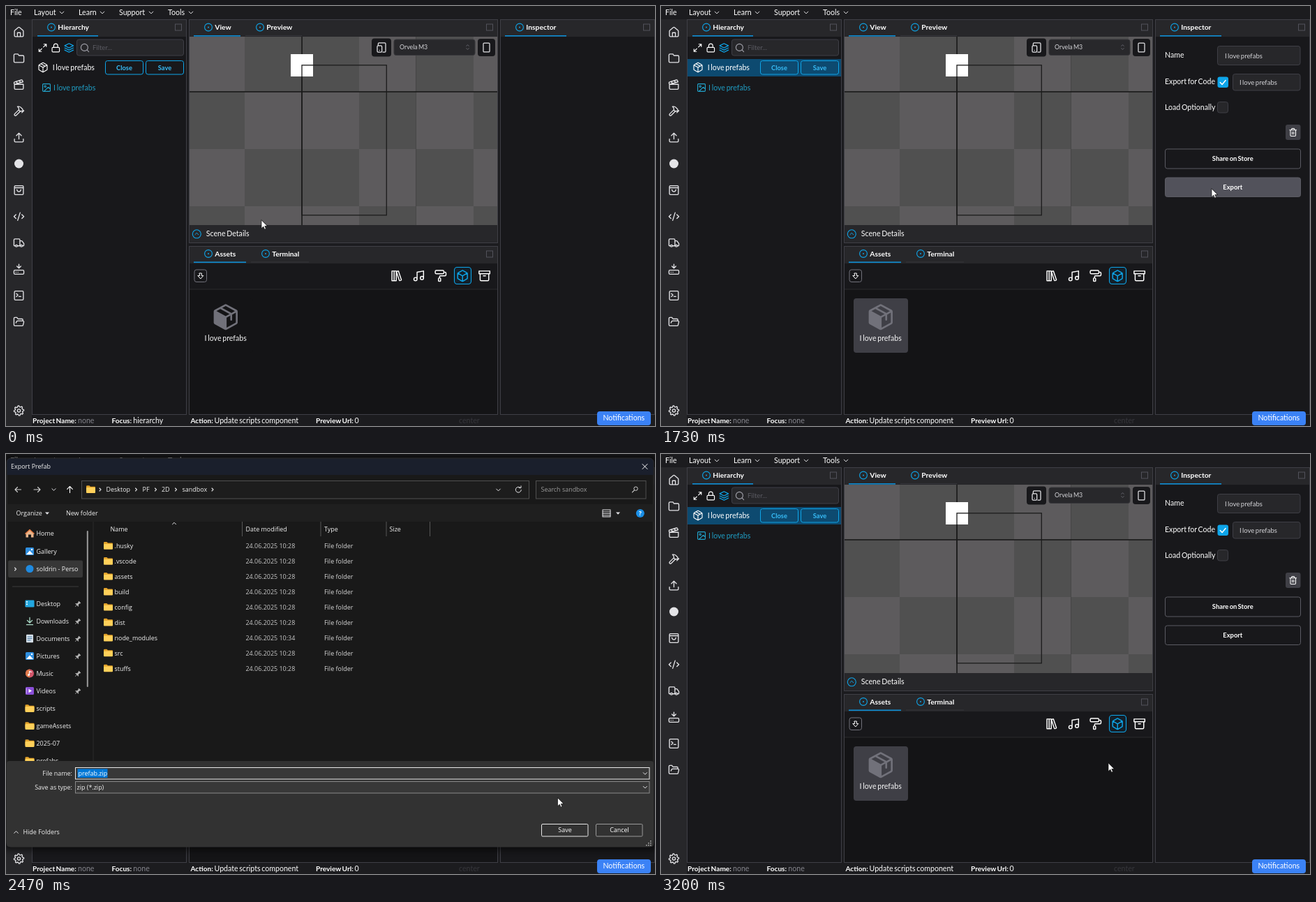
These frames come from a looping animation (930 by 602 pixels, 4200 ms). An HTML page:

```html
<!DOCTYPE html>
<html lang="en">
<head>
<meta charset="utf-8">
<title>Prefab export</title>
<style>
html, body { margin: 0; width: 100%; height: 100%; overflow: hidden; background: #1c1c1f; }
svg { display: block; width: 930px; height: 602px; }
text { white-space: pre; }
.app { font-family: Lato, "Open Sans", sans-serif; word-spacing: -1px; }
.win { font-family: "Open Sans", "Noto Sans", sans-serif; }
</style>
</head>
<body>
<svg id="stage" viewBox="0 0 930 602" xmlns="http://www.w3.org/2000/svg"></svg>
<script>
const BLUE = '#0ea5e9', LINE = '#3f3f46', BAR = '#27272a', BODY = '#18181b', PALE = '#e4e4e7';

// Drawing helpers: each returns markup
const rect = (x, y, w, h, fill, rx = 0, stroke = 'none', sw = 1) =>
  `<rect x="${x}" y="${y}" width="${w}" height="${h}" rx="${rx}" fill="${fill}" stroke="${stroke}" stroke-width="${sw}"/>`;
const circle = (x, y, r, fill, stroke = 'none', sw = 1.2) =>
  `<circle cx="${x}" cy="${y}" r="${r}" fill="${fill}" stroke="${stroke}" stroke-width="${sw}"/>`;
const text = (x, y, str, size = 10.6, fill = '#fff', weight = 400, anchor = 'start') =>
  `<text x="${x}" y="${y}" font-size="${size}" fill="${fill}" font-weight="${weight}" text-anchor="${anchor}">${str}</text>`;
const bold = (x, y, str, fill = '#fff', size = 10.3, anchor = 'start') => text(x, y, str, size, fill, 700, anchor);
const line = (d, stroke = PALE, sw = 1, fill = 'none') =>
  `<path d="${d}" fill="${fill}" stroke="${stroke}" stroke-width="${sw}" stroke-linecap="round" stroke-linejoin="round"/>`;
const shape = (d, fill) => `<path d="${d}" fill="${fill}" fill-rule="evenodd"/>`;
const at = (x, y, s, body) => `<g transform="translate(${x} ${y}) scale(${s})">${body}</g>`;
const chevron = (x, y, r, dir = 1, color = PALE, sw = 1) =>
  line(`M${x - r} ${y - dir * r / 2}l${r} ${dir * r}l${r} ${-dir * r}`, color, sw);
const next = (x, y) => line(`M${x - 1} ${y - 2}l2 2l-2 2`, PALE, 1.1);

// Icons on a 24 unit grid
const gear = Array.from({ length: 32 }, (_, i) => {
  const r = i % 4 < 2 ? 10 : 7.6, a = (i + 0.5) * Math.PI / 16 - 0.3;
  return (i ? 'L' : 'M') + (12 + r * Math.cos(a)).toFixed(2) + ' ' + (12 + r * Math.sin(a)).toFixed(2);
}).join('') + 'Z';
const ring = (x, y, r) => `M${x - r} ${y}a${r} ${r} 0 1 0 ${2 * r} 0a${r} ${r} 0 1 0 ${-2 * r} 0`;
const cube = 'M21 8a2 2 0 0 0-1-1.7l-7-4a2 2 0 0 0-2 0l-7 4A2 2 0 0 0 3 8v8a2 2 0 0 0 1 1.7l7 4a2 2 0 0 0 2 0l7-4A2 2 0 0 0 21 16zM3.3 7 12 12l8.7-5M12 22V12';
const ICONS = {
  home: 'M3 10a2 2 0 0 1 .7-1.5l7-6a2 2 0 0 1 2.6 0l7 6a2 2 0 0 1 .7 1.5v9a2 2 0 0 1-2 2H5a2 2 0 0 1-2-2zM9 21v-8h6v8',
  folder: 'M20 20a2 2 0 0 0 2-2V8a2 2 0 0 0-2-2h-8l-2-3H4a2 2 0 0 0-2 2v13a2 2 0 0 0 2 2z',
  clapper: 'M20.2 6 3 11l-.9-2.4a2 2 0 0 1 1.4-2.5l13.5-4a2 2 0 0 1 2.4 1.4zM6.2 5.3l3.1 3.9M12.4 3.4l3.1 4M3 11h18v8a2 2 0 0 1-2 2H5a2 2 0 0 1-2-2z',
  hammer: 'm15 12-8.5 8.5a2 2 0 0 1-3-3L12 9M18 15l4-4M21.5 11.5l-2-2V8L16 4.4a6 6 0 0 0-4.2-1.8H9l1 1A6 6 0 0 1 12 8v2l2 2h2z',
  upload: 'M21 15v4a2 2 0 0 1-2 2H5a2 2 0 0 1-2-2v-4M17 8l-5-5-5 5M12 3v12',
  bag: 'M5 3h14a2 2 0 0 1 2 2v14a2 2 0 0 1-2 2H5a2 2 0 0 1-2-2V5a2 2 0 0 1 2-2zM3 7h18M16 11a4 4 0 0 1-8 0',
  code: 'm18 16 4-4-4-4M6 8l-4 4 4 4M14.5 4l-5 16',
  truck: 'M14 18V6a2 2 0 0 0-2-2H4a2 2 0 0 0-2 2v11a1 1 0 0 0 1 1h2M15 18H9M19 18h2a1 1 0 0 0 1-1v-3.7l-3.7-4.9a1 1 0 0 0-.8-.4H14' + ring(7, 18, 2) + ring(17, 18, 2),
  drive: 'M12 2v8M16 6l-4 4-4-4M4 14h16a2 2 0 0 1 2 2v4a2 2 0 0 1-2 2H4a2 2 0 0 1-2-2v-4a2 2 0 0 1 2-2zM6 18h.01M10 18h.01',
  terminal: 'M5 3h14a2 2 0 0 1 2 2v14a2 2 0 0 1-2 2H5a2 2 0 0 1-2-2V5a2 2 0 0 1 2-2zM7 8l3 3-3 3M12 14h4',
  open: 'm6 14 1.5-2.9A2 2 0 0 1 9.2 10H20a2 2 0 0 1 1.9 2.5l-1.5 6a2 2 0 0 1-2 1.5H4a2 2 0 0 1-2-2V5a2 2 0 0 1 2-2h4l2 3h8a2 2 0 0 1 2 2v2',
  gear: gear + ring(12, 12, 3),
  books: 'M3 3h8v18H3zM7 3v18M20.4 18.9a1 1 0 0 1-.6 1.3l-1.9.6a1 1 0 0 1-1.3-.6L11.5 5.1a1 1 0 0 1 .6-1.3l1.9-.6a1 1 0 0 1 1.3.6z',
  music: 'M9 18V5l12-2v13' + ring(6, 18, 3) + ring(18, 16, 3),
  roller: 'M4 2h12a2 2 0 0 1 2 2v2a2 2 0 0 1-2 2H4a2 2 0 0 1-2-2V4a2 2 0 0 1 2-2zM10 16v-2a2 2 0 0 1 2-2h8a2 2 0 0 0 2-2V7a2 2 0 0 0-2-2h-2M9 16h2a1 1 0 0 1 1 1v4a1 1 0 0 1-1 1H9a1 1 0 0 1-1-1v-4a1 1 0 0 1 1-1z',
  cube,
  parcel: cube + 'M7.5 4.3l9 5.1',
  archive: 'M2 3h20v5H2zM4 8v11a2 2 0 0 0 2 2h12a2 2 0 0 0 2-2V8M10 12h4',
  expand: 'M15 3h6v6M9 21H3v-6M21 3l-7 7M3 21l7-7',
  lock: 'M5 11h14a2 2 0 0 1 2 2v7a2 2 0 0 1-2 2H5a2 2 0 0 1-2-2v-7a2 2 0 0 1 2-2zM7 11V7a5 5 0 0 1 10 0v4',
  layers: 'M12 2 22 7 12 12 2 7zM2 12l10 5 10-5M2 17l10 5 10-5',
  search: ring(11, 11, 8) + 'M21 21l-4.3-4.3',
  image: 'M5 3h14a2 2 0 0 1 2 2v14a2 2 0 0 1-2 2H5a2 2 0 0 1-2-2V5a2 2 0 0 1 2-2zM21 15l-5-4L6 21' + ring(9, 9, 2),
  trash: 'M3 6h18M19 6v14a2 2 0 0 1-2 2H7a2 2 0 0 1-2-2V6M8 6V4a2 2 0 0 1 2-2h4a2 2 0 0 1 2 2v2M10 11v6M14 11v6',
  down: 'M9 4h6v7h5l-8 9-8-9h5z',
  phone: 'M7 2h10a2 2 0 0 1 2 2v16a2 2 0 0 1-2 2H7a2 2 0 0 1-2-2V4a2 2 0 0 1 2-2z',
  devices: 'M5 8V4a2 2 0 0 1 2-2h12a2 2 0 0 1 2 2v16a2 2 0 0 1-2 2h-4M5 8h6a2 2 0 0 1 2 2v10a2 2 0 0 1-2 2H5a2 2 0 0 1-2-2V10a2 2 0 0 1 2-2zM8 18h.01'
};
const icon = (name, x, y, size = 17, color = PALE, sw = 1.9) =>
  at(x - size / 2, y - size / 2, size / 24, line(ICONS[name], color, sw));

const tab = (x, y, label, from, to, active = true) =>
  circle(x, y, 5.4, 'none', BLUE, 1.1) + circle(x, y, 1, BLUE) + bold(x + 9.3, y + 3.8, label) +
  rect(from, y + 11.5, to - from, active ? 1.6 : 1, active ? '#0e8fd6' : '#36363b');
const panel = (x, y, w, h) =>
  rect(x + .5, y + .5, w - 1, h - 1, BODY, 0, LINE) + rect(x + 1, y + 1, w - 2, 24, BAR) +
  rect(x + w - 16.5, y + 7, 9, 9, 'none', 0, '#52525b');
const field = (x, y, w, h, rx = 3) => rect(x + .5, y + .5, w - 1, h - 1, BAR, rx, LINE);

function sidebar() {
  const names = ['home', 'folder', 'clapper', 'hammer', 'upload', '', 'bag', 'code', 'truck', 'drive', 'terminal', 'open'];
  return rect(0, 19, 37, 583, BAR) +
    names.map((n, i) => n ? icon(n, 18.5, 37.5 + i * 37.75) : circle(18.5, 226, 6.5, PALE)).join('') +
    icon('gear', 18.5, 580);
}

function menus() {
  return [['File', 6], ['Layout', 40, 80], ['Learn', 104, 138], ['Support', 162, 208], ['Tools', 232, 265]]
    .map(([s, x, c]) => text(x, 12.6, s) + (c ? chevron(c, 9.5, 2.8) : '')).join('');
}

function hierarchy() {
  return panel(37, 19, 222, 567) + tab(65, 30.5, 'Hierarchy', 45, 132) +
    icon('expand', 52.5, 60, 14, '#fff', 2) + icon('lock', 71.3, 60, 14, '#fff', 2) + icon('layers', 90.3, 60, 15, BLUE) +
    field(101, 47.5, 154, 24) + icon('search', 113, 60, 15, '#a1a1aa', 1.8) + text(124, 63, 'Filter...', 9.5, '#5b5b63') +
    `<rect id="row" x="38" y="76" width="220" height="25" fill="#0d4a70"/>` +
    icon('parcel', 53, 88, 16, '#fff', 1.7) + text(66.7, 91.5, 'I love prefabs') +
    [[142, 'Close'], [200, 'Save']].map(([x, s]) =>
      rect(x + .5, 78.5, 54, 19.5, 'none', 3, BLUE) + bold(x + 27.5, 92, s, '#38bdf8', 9.3, 'middle')).join('') +
    icon('image', 58, 117, 14.5, '#22a3cb') + text(68, 120.5, 'I love prefabs', 10.6, '#1f9cc2');
}

function view() {
  let out = panel(262, 19, 443, 321) + tab(290, 30.5, 'View', 269, 336) + tab(364, 30.5, 'Preview', 343, 424, false);
  const xs = [263, 342, 424, 506, 587.5, 670, 704], ys = [44, 123, 205, 287, 314];
  // Tiles mirror at the vertical axis
  for (let r = 0; r < 4; r++) for (let c = 0; c < 6; c++) {
    const side = c < 2 ? 1 - c : c - 2;
    out += rect(xs[c], ys[r], xs[c + 1] - xs[c], ys[r + 1] - ys[r], (r + side) % 2 ? '#5d5b5d' : '#505050');
  }
  out += rect(263, 122.2, 441, 1.5, '#151515') + rect(423.3, 44, 1.5, 270, '#151515') +
    rect(408, 69, 32, 32, '#fff') + rect(424, 84.8, 121.3, 215, 'none', 0, '#1c1c1c', 1.3) +
    rect(524, 46.5, 28, 26, BODY, 4) + icon('devices', 538, 59.5, 16) +
    rect(556, 48, 116, 22.5, '#28282b', 3, '#37373b') + text(564, 62.2, 'Orvela M3', 8.8, '#d4d4d8') +
    chevron(661.5, 56.5, 1.8, -1, '#71717a', .8) + chevron(661.5, 61.5, 1.8, 1, '#71717a', .8) +
    rect(676, 47, 25, 25, BODY, 4) + icon('phone', 688.5, 59.5, 15.5) +
    rect(263, 314, 441, 25, BAR) + circle(273.3, 326.8, 6, 'none', BLUE, 1.1) + chevron(273.3, 326.5, 2.4, -1, BLUE) +
    text(286.8, 330.3, 'Scene Details');
  return out;
}

// Solid left face, hollow lid and right face with a hanging strap
function parcelFill() {
  const hull = 'M96 -62L8 -110Q0 -114 -8 -110L-96 -62Q-104 -57 -104 -48V48Q-104 57 -96 62L-8 110Q0 114 8 110L96 62Q104 57 104 48V-48Q104 -57 96 -62Z';
  const lid = 'M0 -96L80 -52L50.5 -35.7L-29.8 -79.7ZM0 -8L-80.3 -52L-46.4 -70.6L33.9 -26.6Z';
  const right = 'M88 47.8L8 91.6V5.8L40 -11.7V24a8 8 0 0 0 16 0V-20.4L88 -38Z';
  return at(314.8, 445.8, .165, shape(hull + lid + right, '#71717a'));
}

function assets() {
  return panel(262, 344, 443, 242) + tab(290, 355, 'Assets', 269, 344) + tab(372, 355, 'Terminal', 351, 434, false) +
    rect(263, 369, 441, 37, BODY) + rect(263, 406, 441, 179, '#141416') + rect(263, 405.5, 441, 1, '#2b2b2f') +
    rect(270, 378, 17.5, 17.5, 'none', 3, '#71717a') + icon('down', 278.8, 387, 12, '#fff', 2) +
    rect(642.5, 374.5, 24, 24, '#13202a', 4, BLUE, 1.1) +
    ['books', 'music', 'roller', 'cube', 'archive'].map((n, i) =>
      icon(n, 560 + i * 31.4, 386.8, 18.5, n === 'cube' ? BLUE : '#fff')).join('') +
    `<rect id="card" x="276" y="419" width="78" height="78" rx="4"/>` + parcelFill() +
    text(314.7, 480, 'I love prefabs', 10.6, '#f4f4f5', 400, 'middle');
}

function inspector() {
  return panel(708, 19, 222, 567) + tab(736, 30.5, 'Inspector', 715, 803) + `<g id="props">` +
    text(722, 74, 'Name') + field(797, 57, 119.5, 28) + text(808, 74.5, 'I love prefabs', 9.5, '#d4d4d8') +
    text(722, 112.3, 'Export for Code') + rect(797.5, 101.5, 15.5, 15.5, BLUE, 3) + line('M801.3 109.5l2.8 3l5-6', '#fff', 1.5) +
    field(819, 97, 97.5, 24.5) + text(829, 112.6, 'I love prefabs', 9.5, '#d4d4d8') +
    text(722, 148.5, 'Load Optionally') + rect(797.5, 137.5, 15, 15.5, BAR, 3, LINE) +
    rect(895, 170, 21.5, 22, LINE, 3) + icon('trash', 905.7, 181, 13, '#fff', 2) +
    rect(722.5, 205, 194, 28, 'none', 3, '#5b5b63') + bold(819.3, 222.3, 'Share on Store', '#fff', 9.4, 'middle') +
    `<rect id="export" x="722.5" y="246" width="194" height="27.5" rx="3" stroke="#5b5b63"/>` +
    bold(819.3, 263.2, 'Export', '#fff', 9.4, 'middle') + `</g>`;
}

function status() {
  const label = (x, s) => bold(x, 597.5, s, '#fff', 10.1);
  return rect(37, 586, 893, 16, '#1c1c1f') +
    label(38, 'Project Name:') + text(103, 597.5, 'none', 10.6, '#85858d') +
    label(151.5, 'Focus:') + `<text id="focus" x="182.3" y="597.5" font-size="10.6"></text>` +
    label(264.5, 'Action:') + text(298.5, 597.5, 'Update scripts component') +
    label(444, 'Preview Url:') + text(499.5, 597.5, '0') + text(649, 597.5, 'center', 10.6, '#37373c') +
    rect(847, 581, 77, 20, '#3b82f6', 4) + text(885.3, 594.3, 'Notifications', 10.6, '#fff', 400, 'middle');
}

// File dialog
const W = 8.95;
const say = (x, y, s, fill = '#f0f0f0', anchor = 'start', size = W) => text(x, y, s, size, fill, 400, anchor);
const folder = (x, y) =>
  shape(`M${x} ${y - 4}q0-1.2 1.2-1.2h3.2l1.6 1.5h6q1 0 1 1v6h-13z`, '#e3a32b') +
  rect(x, y - 2.4, 13, 7.8, '#ffd05a', 1);
const picture = y => rect(28, y - 5.5, 12, 11, '#2f8fe0', 1.5) + shape(`M29 ${y + 4.5}l5-5.5l5 5.5z`, '#fff') + circle(37, y - 2.5, 1.2, '#fff');
const pin = y => at(103, y, 1, `<g transform="rotate(45)">${shape('M-2-4h4v1l-.7 1v2.2l1.7 1.3v.8h-6v-.8l1.7-1.3v-2.2l-.7-1z', '#b5b5b5')}${line('M0 2v3', '#b5b5b5', .8)}</g>`);

const NAV = [
  ['Home', 114, y => shape(`M27.5 ${y}l6.5-6l6.5 6l-1 1v4.5h-3.5v-4h-4v4h-3.5v-4.5z`, '#e9b48a') + line(`M28 ${y}l6-5.5l6 5.5`, '#e0733a', 1.3)],
  ['Gallery', 139.5, picture],
  ['soldrin - Perso', 164.5, y => circle(34, y, 5.5, '#1f8ae0')],
  ['Desktop', 214.5, y => rect(27.5, y - 5, 13, 10, '#22a7e0', 1.2) + rect(29, y - 3.3, 2, 1.6, '#fff') + rect(29, y, 2, 1.6, '#fff')],
  ['Downloads', 239.5, y => line(`M34 ${y - 5}v7.5m-3.5-3.5l3.5 3.5l3.5-3.5M29.5 ${y + 5.2}h9`, '#a9d8c4', 1.3)],
  ['Documents', 264.5, y => rect(29, y - 5.8, 10, 11.6, '#d5dfe8', 1) + line(`M31 ${y - 2.5}h6m-6 2.5h6m-6 2.5h4`, '#4b7ca5', 1)],
  ['Pictures', 289.5, picture],
  ['Music', 314.5, y => circle(34, y, 6, '#d2576b') + shape(`M34 ${y - 6}a6 6 0 0 0 0 12z`, '#e07b4b') + line(`M33.5 ${y + 2}v-5l3 1`, '#fff', 1.2) + circle(32.5, y + 2.2, 1.4, '#fff')],
  ['Videos', 339.5, y => rect(28, y - 5.5, 12, 11, '#8a4fd8', 1.5) + shape(`M32.5 ${y - 2.7}l4.5 2.7l-4.5 2.7z`, '#fff') + line(`M29.3 ${y - 3.5}v7`, '#d9c2f5', .8)],
  ...['scripts', 'gameAssets', '2025-07', 'prefabs'].map((s, i) => [s, 364.5 + i * 25, y => folder(27.5, y)])
];
const FILES = ['.husky', '.vscode', 'assets', 'build', 'config', 'dist', 'node_modules', 'src', 'stuffs'];

function navigation() {
  return rect(3, 152.5, 107, 24.5, '#373737', 2) + next(13.5, 165) + rect(9, 189.5, 95, 1, '#3d3d3d') +
    `<g clip-path="url(#nav)">` + NAV.map(([s, y, draw]) =>
      draw(y) + say(43.5, y + 3.4, s) + (y > 200 && y < 350 ? pin(y + .5) : '')).join('') + '</g>' +
    rect(115.8, 110, 2, 224, '#9b9b9b', 1) + rect(124.5, 97, 1, 343, '#2d2d2d');
}

function fileList() {
  return say(149.5, 110.7, 'Name') + chevron(241, 99.5, 2.5, -1) + say(343.5, 110.7, 'Date modified') +
    say(456, 110.7, 'Type') + say(549.5, 110.7, 'Size') +
    [338, 450.5, 544.5, 607].map(x => rect(x, 97, 1, 21, '#565656')).join('') +
    FILES.map((s, i) => {
      const y = 131.3 + i * 21.95;
      return folder(140, y) + say(155.5, y + 3.6, s) +
        say(343.5, y + 3.6, `24.06.2025 10:${s === 'node_modules' ? 34 : 28}`, '#c8c8c8') + say(456, y + 3.6, 'File folder', '#d8d8d8');
    }).join('');
}

function dialogTop() {
  const crumbs = [['Desktop', 143.5, 135], ['PF', 195.5, 186.5], ['2D', 223, 214.5], ['sandbox', 252.5, 243.5]];
  return say(7, 21.3, 'Export Prefab') + line('M912 14.5l7 7m0-7l-7 7', '#fff', 1) +
    line('M21.5 51h-8.5m3.5-3.5l-3.5 3.5l3.5 3.5', '#d0d0d0', 1.1) + line('M40 51h9m-3.5-3.5l3.5 3.5l-3.5 3.5', '#d0d0d0', 1.1) +
    chevron(68.5, 51, 2.6) + line('M91.5 55.5v-9m-3.8 3.8l3.8-3.8l3.8 3.8', '#fff', 1.1) +
    rect(108.5, 38.5, 641, 25.5, '#1d1d1d', 0, '#505050') + folder(115, 50.5) +
    crumbs.map(([s, x, c]) => next(c, 51) + say(x, 54.4, s)).join('') +
    chevron(705.5, 51.5, 2.8) + line('M737 48.2a4 4 0 1 0 1.3 3.3M738 45.8v2.8h-2.8', PALE, 1) +
    rect(759.5, 38.5, 157.5, 25.5, '#1d1d1d', 0, '#505050') + say(766.5, 54.4, 'Search sandbox', '#9a9a9a') +
    circle(902.5, 49.7, 2.7, 'none', '#d0d0d0', 1) + line('M900.4 51.8l-3 3', '#d0d0d0', 1.1) +
    circle(908.8, 85, 6, '#1b8fe6') + text(908.8, 88, '?', 8.5, '#fff', 700, 'middle') +
    `<g id="tools">` + next(296, 51) + say(14.5, 88.2, 'Organize') + shape('M56 83.5h6l-3 3.3z', PALE) + say(86, 88.2, 'New folder') +
    rect(855, 80, 11, 10, 'none', 0, PALE) + line('M855 83h11m-11 2.5h11m-11 2.5h11', PALE, .9) + shape('M874 83.5h6l-3 3.3z', PALE) + '</g>';
}

function dialogBottom() {
  return rect(1, 440, 927, 123, '#323232', 4) + say(95, 461, 'File name:', '#f0f0f0', 'end') + say(95, 480.8, 'Save as type:', '#f0f0f0', 'end') +
    rect(99.5, 449.5, 822.5, 16.5, '#383838', 0, '#e8e8e8') + rect(102.5, 451.3, 43, 12.7, '#0078d7') + say(103.5, 460.8, 'prefab.zip', '#fff') +
    rect(99.5, 469.5, 822.5, 16.5, '#383838', 0, '#8a8a8a') + say(101.5, 480.8, 'zip (*.zip)') +
    chevron(915.8, 458, 2.6) + chevron(915.8, 477.7, 2.6) + chevron(14.5, 542, 2.8, -1) + say(24.5, 545, 'Hide Folders') +
    `<rect id="save" x="767.5" y="530.5" width="66.5" height="17.5" rx="1.5" stroke="#e8e8e8"/>` + say(801, 542.4, 'Save', '#fff', 'middle') +
    rect(845.5, 530.5, 66.5, 17.5, '#323232', 1.5, '#9a9a9a') + say(879, 542.4, 'Cancel', '#fff', 'middle') +
    [[923, 555], [920, 558], [923, 558], [917, 561], [920, 561], [923, 561]].map(([x, y]) => rect(x, y - 1, 1.6, 1.6, '#a8a8a8')).join('');
}

function dialog() {
  return `<g id="dialog" class="win"><g opacity=".55" filter="url(#soft)">${rect(-4, 0, 938, 568, '#000', 8)}</g>` +
    rect(1, 6, 927, 557, '#191919', 6, '#3a3a3a', .8) + shape('M1.4 30V12q0-5.6 5.6-5.6H922q5.6 0 5.6 5.6V30z', '#1a1f2c') +
    rect(1.4, 72, 926, 25, '#1f1f1f') + dialogTop() + navigation() + fileList() + dialogBottom() + '</g>';
}

// Unpainted dialog, still growing into place
function blankDialog() {
  const white = (x, y, w, h) => rect(x, y, w, h, '#fff');
  return `<g id="blank" class="win" opacity=".6">` + rect(31, 24.5, 859, 517.5, '#191919', 5, '#444', .8) +
    rect(31.5, 25, 858, 22, '#1a1f2c', 4) + say(37, 38.5, 'Export Prefab', '#f0f0f0', 'start', 8.3) +
    line('M876 32l6.5 6.5m0-6.5l-6.5 6.5', '#fff', 1) + white(31, 47, 859, 62) + white(31, 427.5, 859, 72.5) +
    rect(31, 500, 859, 42, '#323232', 4) + white(38, 514, 77, 15) + white(741, 510, 64, 19) + white(814, 510, 64, 19) + white(878, 529, 12, 13) +
    white(131.5, 109, 12.5, 318.5) + rect(132, 121, 11.5, 251, '#d4d4d4', 0, '#888') + rect(144, 109, 3, 318, '#333') +
    shape('M135 117.5h6l-3-3.5z', '#333') + shape('M135 419.5h6l-3 3.5z', '#333') + chevron(254, 110.5, 2.3, -1) +
    [['Name', 168.5], ['Date modified', 348.8], ['Type', 453.5], ['Size', 540]].map(([s, x]) => say(x, 121.7, s, '#fff', 'start', 8.3)).join('') +
    [344, 448, 535, 593].map(x => rect(x, 109, 1, 19, '#777')).join('') + say(518, 147, 'Working on it...', '#fff', 'middle', 8.5) + '</g>';
}

function pointers() {
  return `<g id="arrow">${line('M0 0V11.8L2.8 9.2L4.6 13.2L6.5 12.3L4.8 8.5H8.4Z', '#111', .7, '#fff')}</g>` +
    `<g id="hand">${line('M-1.3 1.2a1.3 1.3 0 0 1 2.6 0v4.5l1.1-.3l1.2.6l1-.2l1.1.7l.8-.1q1.3.4 1.3 1.8v3q0 2-1.1 3.2v2H-.6v-1.6L-4 10.6q-1-1.6.2-2.1t2.5 1.6z', '#111', .7, '#fff')}</g>`;
}

const stage = document.getElementById('stage');
stage.innerHTML = `<defs><clipPath id="nav"><rect x="0" y="97" width="109" height="343"/></clipPath>
  <filter id="soft" x="-5%" y="-5%" width="110%" height="110%"><feGaussianBlur stdDeviation="5"/></filter></defs>` +
  rect(0, 0, 930, 602, '#1c1c1f') +
  `<g class="app">${menus()}${sidebar()}${hierarchy()}${view()}${assets()}${inspector()}${status()}</g>` +
  blankDialog() + dialog() + pointers();

const el = id => document.getElementById(id);
const show = (id, on) => el(id).setAttribute('display', on ? 'inline' : 'none');

// Pointer stops: tick, x, y
const PATH = [[0, 366, 307], [8, 325.5, 455], [11, 325.5, 455], [18, 786.5, 262], [24, 786.5, 262],
  [26, 789, 262], [28, 789, 262], [30, 740, 297], [32, 740, 297], [39, 803, 541.5], [43, 803, 541.5], [48, 641, 443]];
function pointerAt(k) {
  const i = PATH.findIndex(p => p[0] > k);
  if (i < 0) return PATH[PATH.length - 1].slice(1);
  const [k0, x0, y0] = PATH[i - 1], [k1, x1, y1] = PATH[i];
  const u = (k - k0) / (k1 - k0), e = u * u * (3 - 2 * u);
  return [x0 + (x1 - x0) * e, y0 + (y1 - y0) * e];
}
const inside = ([x, y], l, t, r, b) => x >= l && x <= r && y >= t && y <= b;

// Dialog opacity and scale while it opens or closes
const FADE = { 29: [.93, .985], 43: [.88, 1.0015], 44: [.45, .975], 45: [.15, .95] };

const LOOP = 4200, TICK = 1000 / 15;

function render(t) {
  const k = Math.floor((t + 3.5) / TICK);
  const pos = pointerAt(k);
  const onCard = k < 28 && inside(pos, 276, 419, 354, 497);
  const onExport = k >= 12 && k < 29 && inside(pos, 722, 245, 917, 274);
  const hand = k < 25 && (onCard || onExport);

  show('row', k >= 12);
  show('props', k >= 12);
  el('card').setAttribute('fill', k >= 11 ? LINE : onCard ? BAR : '#141416');
  el('export').setAttribute('fill', onExport ? '#52525b' : BODY);
  el('focus').textContent = k < 9 ? 'hierarchy' : k < 24 ? 'assets' : 'none';
  el('focus').setAttribute('fill', k < 24 ? '#fff' : '#85858d');

  show('blank', k === 28);
  show('dialog', k > 28 && k < 46);
  show('tools', k > 30);
  const [alpha, size] = FADE[k] || [1, 1];
  el('dialog').setAttribute('opacity', alpha);
  el('dialog').setAttribute('transform', `translate(464.5 284.5) scale(${size}) translate(-464.5 -284.5)`);
  el('save').setAttribute('fill', inside(pos, 767, 530, 834, 548) ? '#5f5f5f' : '#323232');

  show('hand', hand);
  show('arrow', !hand);
  el(hand ? 'hand' : 'arrow').setAttribute('transform', `translate(${pos[0]} ${pos[1]})`);
}

const start = performance.now();
function loop() {
  render((performance.now() - start) % LOOP);
  requestAnimationFrame(loop);
}
loop();
</script>
</body>
</html>
```
